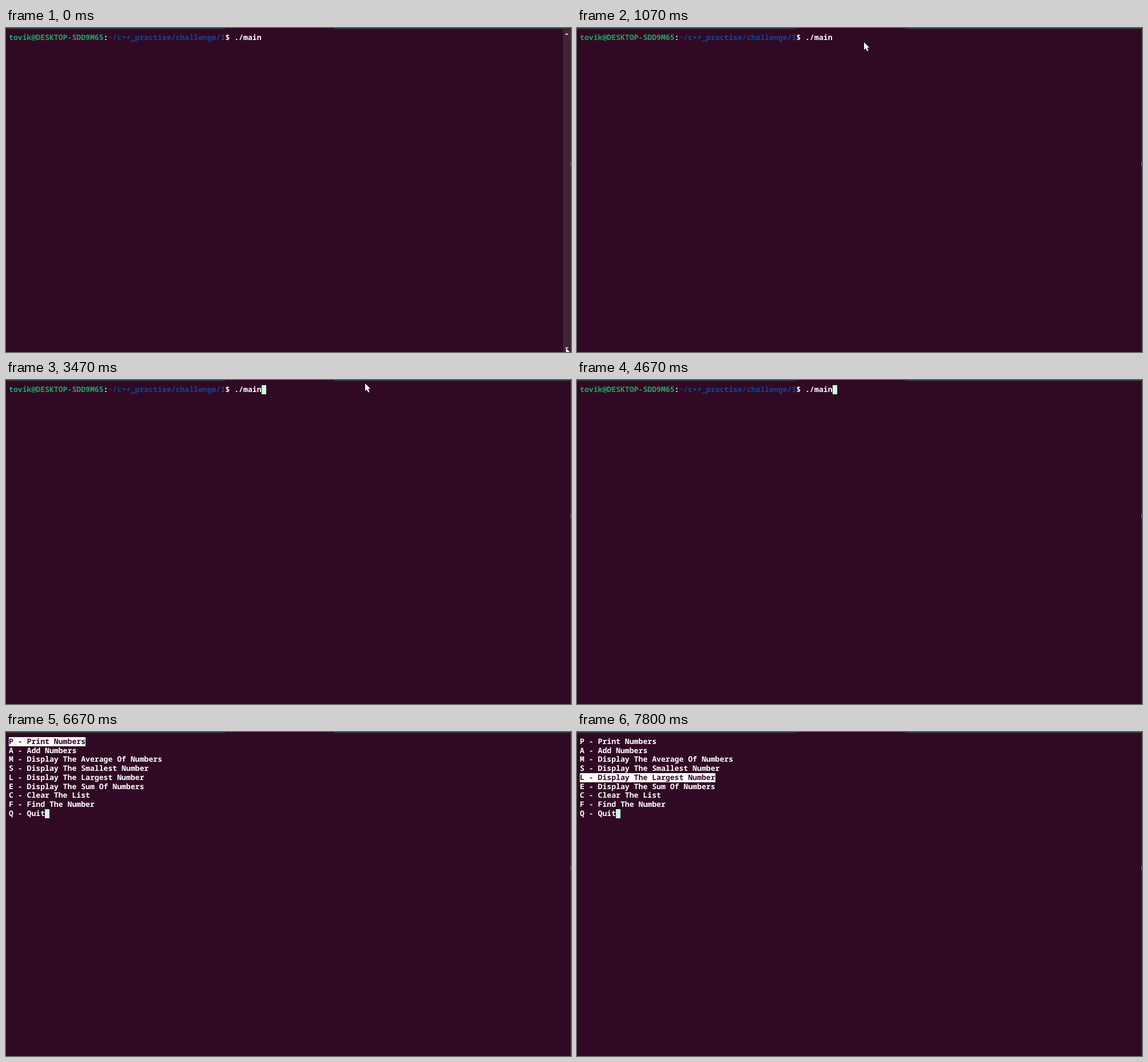
An HTML page that plays this animation: 988 by 567 pixels, repeating every 8 s.

```html
<!DOCTYPE html>
<html lang="en">
<head>
<meta charset="utf-8">
<title>Terminal menu</title>
<style>
  :root { --bg: #300a24; --row: 15.75px; --loop: 8000ms step-end infinite; }
  html, body { margin: 0; width: 100%; height: 100%; overflow: hidden; background: var(--bg); }
  #stage {
    position: relative; width: 988px; height: 567px; overflow: hidden;
    background: var(--bg); color: #fff;
    font: 600 13.155px/var(--row) "Noto Sans Mono", "DejaVu Sans Mono", monospace;
    text-rendering: geometricPrecision; font-variant-ligatures: none; white-space: pre;
  }
  #stage > * { position: absolute; }

  .tabs { top: 0; height: 2px; background: #303033; }
  .edge { left: 987px; top: 2px; width: 1px; height: 565px; background: #41283a; }
  .mark { left: 987px; top: 234px; width: 1px; height: 8px; background: #84747e; }

  .text { left: 5px; top: 8.9px; }
  .user { color: #26a269; }
  .path { color: #12488b; }
  .prompt { animation: prompt var(--loop); }
  .menu { animation: menu var(--loop); }
  .menu div { width: max-content; height: var(--row); }
  .caret { width: 8px; height: 16px; background: #cffae0; }
  .shell { left: 447px; top: 9px; animation: shell var(--loop); }
  .app { left: 68px; top: 135px; animation: app var(--loop); }

  @keyframes prompt { 0% { visibility: visible } 69.1%, to { visibility: hidden } }
  @keyframes menu { 0% { visibility: hidden } 69.1%, to { visibility: visible } }
  @keyframes shell {
    0%, 50.85%, 65%, to { opacity: 0 }
    43.35%, 58.35% { opacity: 1 }
  }
  @keyframes app {
    0%, 76.6% { opacity: 0 }
    69.1%, 83.35%, to { opacity: 1 }
  }

  /* highlighted menu row */
  .menu div:nth-child(1) { animation: row1 var(--loop); }
  .menu div:nth-child(2) { animation: row2 var(--loop); }
  .menu div:nth-child(3) { animation: row3 var(--loop); }
  .menu div:nth-child(4) { animation: row4 var(--loop); }
  .menu div:nth-child(5) { animation: row5 var(--loop); }
  @keyframes row1 { 0% { background: #fff; color: var(--bg) } 88.35%, to { background: none; color: #fff } }
  @keyframes row2 { 88.35% { background: #fff; color: var(--bg) } 94.1% { background: none; color: #fff } }
  @keyframes row3 { 94.1% { background: #fff; color: var(--bg) } 95.85% { background: none; color: #fff } }
  @keyframes row4 { 95.85% { background: #fff; color: var(--bg) } 97.48% { background: none; color: #fff } }
  @keyframes row5 { 97.48%, to { background: #fff; color: var(--bg) } }

  .scroll { left: 974px; top: 2px; animation: fade 8000ms linear infinite; }
  @keyframes fade { 0%, 8.3% { opacity: 1 } 11.6%, to { opacity: 0 } }

  .mouse { left: 0; top: 0; overflow: visible; animation: move var(--loop); }
  @keyframes move {
    0% { transform: translate(979px, 560px) }
    .83% { transform: translate(979px, 560px); animation-timing-function: steps(5, start) }
    4.95% { transform: translate(608px, 192px) }
    6.6% { transform: translate(608px, 192px); animation-timing-function: steps(9, start) }
    14.1% { transform: translate(502px, 25px) }
    18.3% { transform: translate(502px, 25px); animation-timing-function: steps(5, start) }
    22.45% { transform: translate(466px, 14px) }
    30.8% { transform: translate(466px, 14px); animation-timing-function: steps(3, start) }
    33.3% { transform: translate(684px, 31px); animation-timing-function: steps(3, start) }
    35.8% { transform: translate(628px, 6px); opacity: 1 }
    47.45%, to { transform: translate(628px, 6px); opacity: 0 }
  }
</style>
</head>
<body>
<div id="stage">
  <div class="tabs" style="left:0;width:383px"></div>
  <div class="tabs" style="left:574px;width:414px"></div>
  <div class="edge"></div>
  <div class="mark"></div>

  <div class="text prompt"><span class="user">tovik@DESKTOP-SDD9M65</span>:<span class="path">~/c++_practise/challenge/1</span>$ ./main</div>
  <div class="caret shell"></div>

  <div class="text menu"><div>P - Print Numbers</div><div>A - Add Numbers</div><div>M - Display The Average Of Numbers</div><div>S - Display The Smallest Number</div><div>L - Display The Largest Number</div><div>E - Display The Sum Of Numbers</div><div>C - Clear The List</div><div>F - Find The Number</div><div>Q - Quit</div></div>
  <div class="caret app"></div>

  <svg class="scroll" width="13" height="565">
    <rect width="13" height="565" fill="#412434"/>
    <path d="M3 10 6.5 6.5 10 10ZM3 556.5 10 556.5 6.5 560Z" fill="#c8bec4"/>
  </svg>
  <svg class="mouse" width="12" height="18">
    <path d="M0 0V13.2L3 10.4 5.3 15.7 7.5 14.7 5.3 9.6H9.4Z" fill="#fff" stroke="#000" stroke-width=".9" paint-order="stroke"/>
  </svg>
</div>
</body>
</html>
```
